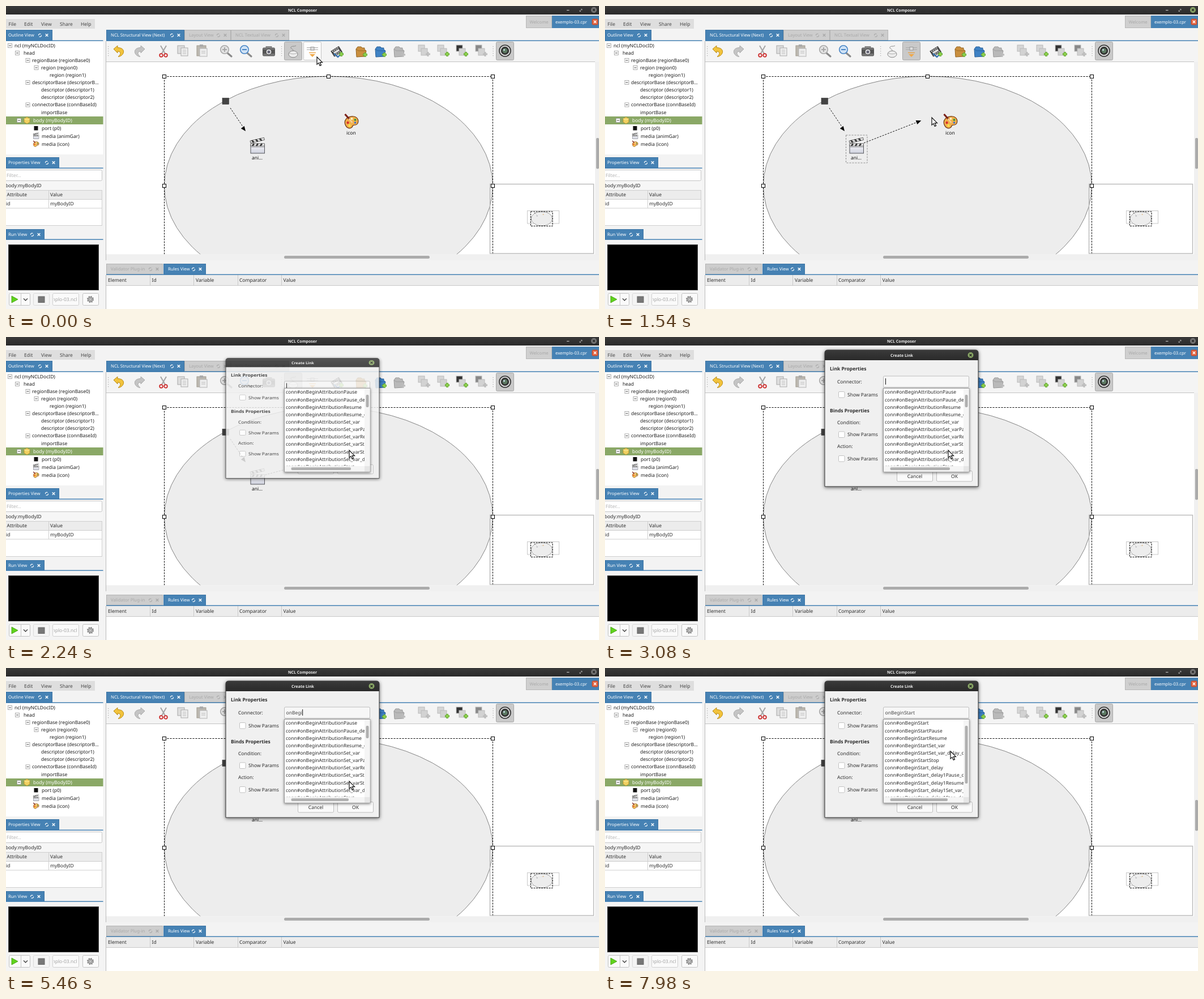
These frames come from a looping animation (1047x535 px, 8000 ms). An HTML page:

```html
<!DOCTYPE html>
<html lang="en">
<head>
<meta charset="utf-8">
<title>NCL Composer</title>
<style>
html, body { margin: 0; width: 100%; height: 100%; overflow: hidden; background: #f3f3f3; }
svg { position: fixed; inset: 0; width: 100%; height: 100%; display: block; }
text { font-family: "Noto Sans", sans-serif; white-space: pre; text-rendering: geometricPrecision; }
</style>
</head>
<body>
<svg id="stage" viewBox="0 0 1047 535"></svg>
<script>
const LOOP = 8000, STEP = 70;
const BLUE = '#4682b4', INK = '#2b2b2b', DIM = '#a9a9a9';
const stage = document.getElementById('stage');

// Markup helpers
const rect = (x, y, w, h, fill, stroke = 'none', more = '') =>
  `<rect x="${x}" y="${y}" width="${w}" height="${h}" fill="${fill}" stroke="${stroke}" ${more}/>`;
const path = (d, stroke = 'none', width = 1, fill = 'none', more = '') =>
  `<path d="${d}" stroke="${stroke}" stroke-width="${width}" fill="${fill}" ${more}/>`;
const disc = (x, y, r, fill, stroke = 'none', more = '') =>
  `<circle cx="${x}" cy="${y}" r="${r}" fill="${fill}" stroke="${stroke}" ${more}/>`;
const text = (x, cy, s, fill = INK, size = 8.5, more = '') =>
  `<text x="${x}" y="${cy + size * .35}" font-size="${size}" fill="${fill}" ${more}>${s}</text>`;
const group = (body, more = '') => `<g ${more}>${body}</g>`;
const at = (x, y, body, scale = 1) => group(body, `transform="translate(${x} ${y}) scale(${scale})"`);
const bold = 'font-weight="700"', mid = 'text-anchor="middle"';
const cross = (x, y, r, color, w = 1.4) =>
  path(`M${x - r} ${y - r}l${2 * r} ${2 * r}m0 ${-2 * r}l${-2 * r} ${2 * r}`, color, w);

function tab(x, y, end, label, active = true) {
  const color = active ? '#fff' : DIM, cy = y + 9.5;
  return rect(x + .5, y + .5, end - x - 1, 18, active ? BLUE : '#cdcdcd', active ? '#3d75a5' : '#b4b4b4') +
    text(x + (x ? 8 : 4), cy, label, color, 7.75) +
    path(`M${end - 24.5} ${cy + .5}a2.5 2.5 0 0 1 4-2.4m1 1.9a2.5 2.5 0 0 1-4 2.4`, color, 1.2) +
    cross(end - 10, cy, 2.3, color);
}

// Icons, each drawn around its own centre
const plus = (x = 7, y = 6) => path(`M${x - 4} ${y}h8m-4-4v8`, '#5d9e2e', 3.6) + path(`M${x - 3.2} ${y}h6.4m-3.2-3.2v6.4`, '#8ed34c', 2.2);
const folder = (color, edge) => path('M-9-4l3-4h6l2 2h4v3l3 2-2 10-15 1z', edge, 1, color) + path('M-9-4l4 3h13', edge, .8);
const folderAdd = (color, edge, live) => folder(color, edge) + (live ? plus() : path('M3 6h8m-4-4v8', '#bbb', 3));
const sheetAdd = (mark, live) => rect(-9, -10, 11, 11, mark, '#b9b9b9') + rect(-4, -4, 11, 12, '#d2d2d2', '#bbb') +
  (live ? plus(8, 6) : path('M4 6h8m-4-4v8', '#bdbdbd', 3));
const curl = (color, edge) => path('M-9-4l7-6v3.5c9 0 12 5 10 10-2 4-6 6-9 6 5-4 6-9-1-9.5v3z', edge, 1, color);
const magnifier = (ring, lens, sign) => path('M3 4l7 6', '#8a8a8a', 3.2, 'none', 'stroke-linecap="round"') +
  disc(-2, -2, 7.3, lens, ring, 'stroke-width="1.6"') + path(sign, ring, 2);
const clapper = () =>
  rect(-12, -.5, 24.5, 14.5, 'url(#slate)', '#55565c') + path('M-11.5 3h23.5', '#777', .8) +
  rect(-12, -3, 24.5, 4, '#f2f2f2', '#444', 'stroke-width=".8"') + path('M-9 1l3-4m4 4l3-4m4 4l3-4', '#333', 2.6) +
  group(rect(-12, -8, 25, 4, '#f2f2f2', '#444', 'stroke-width=".8"') + path('M-6-4l-3-4m10 4l-3-4m10 4l-3-4', '#333', 2.6), 'transform="rotate(-13 -12 -4)"');
const palette = () =>
  path('M-11 5C-13-4-4-9 4-8 12-7 14 0 11 5 8 9 4 6 3 8 2 12-2 14-6 12-9 11-10 8-11 5z', '#6b3410', 1.2, '#f2b04c') +
  disc(-6, 3, 2.2, '#d9302c') + disc(1, -4, 2, '#fff3c0') + disc(7, -2, 2, '#3b9b3b') + disc(7, 3, 1.8, '#3c6fd0') + disc(-3, 8, 2.2, '#f6e04a') +
  path('M-11-12L-3-3', '#7a2018', 3) + path('M-4-4l6 7', '#f0d2a0', 2.2);
const photo = () => rect(-10.5, -6, 21, 14, '#777', '#555', 'rx="1.5"') + rect(-5, -8.5, 10, 3, '#8a8a8a', '#666', 'stroke-width=".7"') +
  rect(-10, -3, 20, 7, '#555') + disc(0, 1, 5, '#e4e4e4', '#444') + disc(0, 1, 2.6, '#667');

function toolbar() {
  const grip = x => Array.from({ length: 5 }, (_, i) => rect(x, 71 + i * 4, 1.2, 1.2, '#aaa')).join('');
  const pages = (a, b) => rect(-9, -9, 12, 14, a, '#aaa') + rect(-3, -5, 12, 14, b, '#aaa') + path('M0-1h6m-6 3h6m-6 3h6', '#bbb');
  return rect(177, 62, 870, 36, '#f4f4f4') + path('M177 98.5H1040', '#c2c2c2') + grip(180) + grip(486) + grip(859.5) +
    at(199, 80, curl('#f2c33c', '#b98a14')) + at(236, 80, group(curl('#c4c4c4', '#aaa'), 'transform="scale(-1 1)"')) +
    at(278, 80, path('M-5-10L3 4M5-10L-3 4', '#a5a5a5', 2) + disc(-4, 7, 2.8, 'none', '#cc2b2b', 'stroke-width="1.8"') + disc(4, 7, 2.8, 'none', '#cc2b2b', 'stroke-width="1.8"')) +
    at(312, 79, pages('#ddd', '#eee')) +
    at(346, 79, rect(-9, -9, 16, 18, '#bcb8b0', '#a09a8e') + rect(-4, -11, 6, 4, '#aaa') + rect(-4, -4, 13, 14, '#eee', '#b4b4b4') + path('M-1 1h7m-7 3h7', '#bbb')) +
    at(388, 79, magnifier('#a8a8a8', '#e2e2e2', 'M-6-2h8m-4-4v8')) +
    at(423, 79, magnifier('#4a86c5', '#cfe2f5', 'M-6-2h8')) + at(464, 80, photo()) +
    rect(491.5, 63.5, 31, 32, '#c9c9c9', '#a8a8a8', 'id="tool1" rx="2"') + rect(525.5, 63.5, 31, 32, '#fdfdfd', '#c4c4c4', 'id="tool2" rx="2"') +
    at(507, 81, `<ellipse cy="4" rx="8" ry="5.8" fill="#ececec" stroke="#888"/>` + path('M0-2c0-4-5-3-4-6s6-1 9-3', '#888', 1) + path('M-7 2q7 3.5 14 0', '#aaa', .9)) +
    at(541, 80, path('M-10-6.5h20M-10-3h20', '#aaa', 1.2) + rect(-3, -7.5, 6, 5.5, '#ddd', '#999') + path('M-5 5h10L0 10z', 'none', 0, '#f0a848') + path('M-6 2.5h12', '#e8a040', 1.3)) +
    at(584, 80, group(rect(-9, -6, 17, 12, '#444') + path('M-7-4h13M-7 4h13', '#eee', 1.6, 'none', 'stroke-dasharray="2 1.5"') + rect(-6, -2, 11, 4, '#d8d8d8'), 'transform="rotate(-32)"') +
      path('M-5 4l7 6 8-8', '#3b75b0', 2.4) + plus(8, 5)) +
    at(627, 80, folderAdd('#c98f3f', '#94641f', 1)) + at(661, 80, folderAdd('#3f82c4', '#285f97', 1)) + at(694, 80, folderAdd('#b9b9b9', '#999')) +
    at(737, 79, sheetAdd('#d6d6d6')) + at(771, 79, sheetAdd('#d6d6d6', 1)) + at(804, 79, sheetAdd('#333', 1)) + at(838, 79, sheetAdd('#888')) +
    rect(865.5, 63.5, 31, 32, '#c9c9c9', '#a8a8a8', 'rx="2"') +
    at(881, 79, disc(0, 0, 10, '#d8d8d8', '#333', 'stroke-width="1.6"') + disc(0, 0, 7.2, '#333') + disc(0, 0, 4.4, '#5c7a62') + disc(-1.5, -1.5, 1.5, '#cde'));
}

function outline() {
  // label, text x, centre y, expander x (0 = leaf)
  const rows = [
    ['ncl (myNCLDocID)', 15, 70, 7], ['head', 31, 83, 20], ['regionBase (regionBase0)', 46, 96, 38.5],
    ['region (region0)', 62, 109, 53.5], ['region (region1)', 77, 122, 0], ['descriptorBase (descriptorB...', 46, 135, 38.5],
    ['descriptor (descriptor1)', 62, 148.5, 0], ['descriptor (descriptor2)', 62, 161.5, 0], ['connectorBase (connBaseId)', 46, 174.5, 38.5],
    ['importBase', 62, 188, 0], ['body (myBodyID)', 48, 202, 23], ['port (p0)', 63, 216, 0],
    ['media (animGar)', 63, 230, 0], ['media (icon)', 63, 244, 0]];
  return rect(0, 62, 171.5, 200, '#fff') + rect(0, 195, 171.5, 14, '#8aa866') +
    rows.map(([s, x, y, box]) => text(x, y, s, y === 202 ? '#fff' : '#1c1c1c') +
      (box ? rect(box - 3.5, y - 3.5, 7, 7, '#fff', '#999', 'stroke-width=".8"') + path(`M${box - 2} ${y}h4`, '#444') : '')).join('') +
    path('M32 199l5-3 5 3v6l-5 3-5-3z', '#b58f2a', .8, '#f0d060') + path('M32 199l5 2 5-2', '#fff0a8') +
    rect(49.5, 212, 7, 7.5, '#111') + at(53, 229, clapper(), .4) + at(53, 243, palette(), .42);
}

function leftDocks() {
  const line = y => rect(0, y, 171.5, 1.6, BLUE);
  return tab(0, 42, 82, 'Outline View') + line(60.5) + outline() +
    tab(0, 267, 94, 'Properties View') + line(285.5) + rect(0, 287, 171.5, 101, '#f6f6f6') +
    rect(-1, 289.5, 170.5, 19, '#fff', '#c4c4c4', 'rx="2"') + text(1, 299, 'Filter...', '#b3b3b3') + text(-1, 317, 'body:myBodyID') +
    rect(-1, 325.5, 170.5, 62, '#fff', '#cfcfcf') + rect(0, 326, 169, 15.5, '#ececec') + text(1.5, 333.5, 'Attribute') + text(78, 333.5, 'Value') +
    text(0, 349.5, 'id') + text(78, 349.5, 'myBodyID') + path('M0 341.5h169M0 357h169M75.5 326v31', '#cfcfcf') +
    tab(0, 394, 68, 'Run View') + line(411.5) + rect(0, 413, 171.5, 122, '#f4f4f4') + rect(4.5, 421.5, 159, 80, '#000', '#444') +
    rect(5.5, 507.5, 37, 21, '#fafafa', '#c2c2c2', 'rx="2"') + path('M26.5 508v20', '#c8c8c8') + path('M10 512l11 6-11 6z', '#3f9b10', .8, '#5fd31c') +
    path('M31 516.5l3.5 3.5 3.5-3.5', '#444', 1.4) + rect(48.5, 507.5, 28, 21, '#f4f4f4', '#dadada', 'rx="2"') + rect(57, 513, 11, 10.5, '#777', '#666') +
    rect(82.5, 507.5, 46, 21, '#fafafa', '#cfcfcf', 'rx="2"') +
    group(text(125.5, 518, 'exemplo-03.ncl', '#a4a4a4', 8.5, 'text-anchor="end"'), 'clip-path="url(#fileClip)"') +
    rect(135.5, 507.5, 28, 21, '#fafafa', '#c2c2c2', 'rx="2"') + disc(149, 518, 5.2, 'none', '#888', 'stroke-width="1.8" stroke-dasharray="2.2 1.88"') +
    disc(149, 518, 4.2, '#b5b5b5', '#777') + disc(149, 518, 1.5, '#f4f4f4', '#888', 'stroke-width=".8"');
}

const nodes = () =>
  rect(382, 162.5, 11.5, 11, '#444', '#333', 'stroke-width=".6"') +
  path('M396 180L419.5 215', '#111', 1, 'none', 'stroke-dasharray="3 2"') + path('M423 221l-8.2-4.8 6-4.2z', 'none', 0, '#000') +
  group(path('', '#111', 1, 'none', 'class="linkLine" stroke-dasharray="3 2"') + path('M0 0l-9-3.7v7.4z', 'none', 0, '#000', 'class="linkHead"'), 'class="link"') +
  at(444, 246, clapper()) + at(609.5, 203, palette()) +
  rect(425.5, 228, 37.5, 49, 'none', '#777', 'class="clapBox" stroke-width=".8" stroke-dasharray="3 2"') +
  rect(590.5, 183.5, 37.5, 49, 'none', '#777', 'class="iconBox" stroke-width=".8" stroke-dasharray="3 2"');

function canvas() {
  const grips = [[279.5, 124.5], [569.5, 124.5], [859.5, 124.5], [279.5, 317.5], [859.5, 317.5]];
  return rect(177, 99, 863, 339.5, '#fff') +
    group(`<ellipse cx="569.5" cy="317.5" rx="290" ry="193.5" fill="#ededed" stroke="#777" stroke-width=".9"/>` + nodes() +
      text(434, 268.5, 'ani...', '#111') + text(601, 224.5, 'icon', '#111') +
      rect(279.5, 124.5, 580, 387, 'none', '#000', 'stroke-dasharray="3 2"') +
      rect(854.5, 314.5, 183, 122.5, 'none', '#b9b9b9', 'stroke-width="1.4"') + rect(920.5, 361.5, 56, 22.5, 'none', '#c8c8c8') +
      `<ellipse cx="946" cy="375.5" rx="18.8" ry="12.6" fill="#ededed" stroke="#888" stroke-width=".8"/>` +
      group(nodes(), 'transform="translate(927 362.8) scale(.0655) translate(-279.5 -124)"') +
      rect(926.5, 363, 38.5, 25.5, 'none', '#000', 'stroke-dasharray="3 1.5"') +
      grips.map(([x, y]) => rect(x - 3, y - 3, 6, 6, '#fff', '#000')).join(''), 'clip-path="url(#viewClip)"') +
    rect(1040, 99, 7, 340, '#f0f0f0') + rect(1042, 233, 5, 54.5, '#ababab', 'none', 'rx="2"') +
    rect(177, 438.5, 870, 10, '#f0f0f0') + rect(491, 441, 257, 5, '#ababab', 'none', 'rx="2.5"') + path('M176.5 62V449', '#bbb');
}

function rulesDock() {
  const heads = [['Element', 180], ['Id', 257.5], ['Variable', 335], ['Comparator', 412], ['Value', 489.5]];
  return tab(177, 455, 277, 'Validator Plug-in', false) + tab(278, 455, 353, 'Rules View') + rect(177, 473.5, 870, 1.6, BLUE) +
    rect(177, 475, 870, 60, '#fff') + rect(177, 475, 870, 18, '#ececec') +
    path('M177 493.5h870M254.5 475v18M331.5 475v18M409.5 475v18M486.5 475v18', '#c9c9c9') + path('M176.5 475v60', '#bbb') +
    heads.map(([s, x]) => text(x, 484.5, s)).join('');
}

function frameTop() {
  const menus = [['File', 4.5], ['Edit', 32], ['View', 62], ['Share', 95], ['Help', 132]];
  return rect(0, 0, 1047, 535, '#f3f3f3') + rect(0, 0, 1047, 15, 'url(#bar)') + text(523.5, 7.5, 'NCL Composer', '#eee', 7, bold + ' ' + mid) +
    path('M990 7.5h4.5', '#bbb', 1.2) + path('M1013 9.5l4-4m-2 0h2v2m-4 0v2h2', '#aaa', .9) +
    disc(1038, 7, 5, '#777', 'none', 'id="close"') + cross(1038, 7, 2, '#222', 1.2) +
    rect(0, 23, 157, 17, '#dedede') + menus.map(([s, x]) => text(x, 32, s, '#444')).join('') +
    rect(918.5, 17.5, 45, 21, '#cfcfcf', '#b8b8b8') + text(924.5, 28, 'Welcome', DIM, 7.7) +
    rect(964, 17, 83, 22, BLUE) + text(970, 28, 'exemplo-03.cpr', '#fff', 7.7) + rect(1035, 23, 10, 10, '#e2603c', '#c94b28', 'rx="1.5"') + cross(1040, 28, 2.2, '#fff') +
    tab(177, 42, 315, 'NCL Structural View (Next)') + tab(315, 42, 397, 'Layout View', false) + tab(397, 42, 500, 'NCL Textual View', false) +
    rect(177, 60.5, 870, 1.6, BLUE);
}

function dialog() {
  const check = y => rect(412.5, y - 5.5, 10.5, 10.5, '#fff', '#c2c2c2', 'rx="1.5"') + text(428, y, 'Show Params');
  const field = y => rect(491.5, y - 10, 151, 20, '#f7f7f7', '#bdbdbd', 'rx="2"');
  const button = (x, s) => rect(x + .5, 236.5, 63, 18.5, '#fafafa', '#bdbdbd', 'rx="2"') + text(x + 32, 246, s, INK, 8.5, mid);
  return path('M388 264V28q0-5 5-5H654q5 0 5 5V264z', '#333', 1, '#f0f0f0', 'filter="url(#shadow)"') +
    path('M388 41V28q0-5 5-5H654q5 0 5 5V41z', 'none', 0, 'url(#bar)') + text(524, 32.5, 'Create Link', '#eee', 7, bold + ' ' + mid) +
    disc(645.5, 32, 5, '#8aa866') + cross(645.5, 32, 2, '#222', 1.2) +
    text(397, 56.5, 'Link Properties', INK, 8.5, bold) + text(410, 79, 'Connector:') + field(79) + check(102) +
    text(397, 130, 'Binds Properties', INK, 8.5, bold) + text(410, 151, 'Condition:') + field(151) + check(172.5) +
    text(410, 193.5, 'Action:') + field(193.5) + check(215) + button(515, 'Cancel') + button(585, 'OK') +
    text(494.5, 79, '', '#444', 8.5, 'id="typed"') + rect(495, 73, 1, 11, '#111', 'none', 'id="caret"');
}

const popup = () => rect(491.5, 90.5, 151.5, 147.5, '#fff', '#999', 'filter="url(#softShadow)"') +
  group(group('', 'id="rows" clip-path="url(#listClip)"') + rect(633, 91, 9.5, 137, '#f5f5f5') + rect(635.5, 102, 5, 23, '#b0b0b0', 'none', 'id="vBar" rx="2"') +
    rect(492, 228, 141, 9.5, '#f5f5f5') + rect(633, 228, 9.5, 9.5, '#e6e6e6') + rect(503.5, 230.3, 105.5, 4.8, '#b0b0b0', 'none', 'id="hBar" rx="2"'), 'id="list"');

const clip = (id, ...box) => `<clipPath id="${id}">${rect(...box, '#000')}</clipPath>`;
const fade = (id, from, to) => `<linearGradient id="${id}" x2="0" y2="1"><stop stop-color="${from}"/><stop offset="1" stop-color="${to}"/></linearGradient>`;
const shade = (id, blur, alpha) => `<filter id="${id}" x="-10%" y="-10%" width="120%" height="120%"><feDropShadow dx="0" dy="1.5" stdDeviation="${blur}" flood-opacity="${alpha}"/></filter>`;
stage.innerHTML = `<defs>${fade('bar', '#3a3a3a', '#2a2a2a')}${fade('slate', '#f6f6fa', '#cfd2de')}${shade('shadow', 3, .6)}${shade('softShadow', 2, .5)}
  ${clip('viewClip', 177, 99, 863, 339.5)}${clip('listClip', 492, 91, 141, 136.5)}${clip('fileClip', 84, 508, 44, 20)}</defs>` +
  frameTop() + toolbar() + leftDocks() + canvas() + rulesDock() + group(dialog(), 'id="dialog"') + group(popup(), 'id="popup"') +
  path('M0 0V13.2l3-2.8 2.2 5 2.3-1-2.2-4.8h4.2z', '#111', 1.2, '#fff', 'id="pointer"');

// Timelines
const pointerKeys = [[0, 549, 90], [70, 548, 89], [280, 543, 87], [350, 543, 87], [1120, 449, 246], [1330, 449, 246],
  [1400, 460, 241], [1540, 577, 197], [1680, 600, 198], [1820, 606, 200], [7420, 606, 200], [7490, 610, 200], [7840, 610, 200], [7910, 620, 185], [7980, 610, 147]];
const typing = [[0, ''], [3220, 'o'], [3430, 'on'], [3780, 'onB'], [3850, 'onBe'], [4060, 'onBen'], [4550, 'onBe'], [4760, 'onBen'], [5250, 'onBe'],
  [5390, 'onBeg'], [5460, 'onBegi'], [5600, 'onBegin'], [6370, 'onBeginS'], [6650, 'onBeginSt'], [6720, 'onBeginSta'], [6930, 'onBeginStar'], [7070, 'onBeginStart']];
const caretOff = [[2590, 3080], [6230, 6370], [7700, LOOP]];
const opening = [[2100, .1, .08], [2170, .55, .5], [2240, .88, .85], [2310, 1, 1]];
const setTails = 'Set_var Set_varPause_delay Set_varResume Set_varStart Set_varStop Set_var_delay Set_var_delayPause';
const lists = [
  [0, 'Attribution', 'Pause Pause_delay Resume Resume_delay Set_var Set_varPause_delay Set_varResume Set_varStart Set_varStop Set_var_delay Start', 22],
  [6370, '', setTails + ' Start StartPause StartResume StartSet_var', 36],
  [6650, 'Start', ' Pause Resume Set_var Set_var_delay_dur Stop _delay _delay1Pause_dur _delay1Resume_dur _delay1Set_var_dur _delay1Stop_delay', 51]];

const $ = id => document.getElementById(id);
const all = (name, fn) => stage.querySelectorAll('.' + name).forEach(fn);
const show = (el, on) => el.style.display = on ? '' : 'none';
const latest = (keys, t) => keys.filter(k => k[0] <= t).pop();

function pointerAt(t) {
  const i = pointerKeys.findIndex(k => k[0] > t);
  if (i < 0) return pointerKeys.at(-1).slice(1);
  const [a, b] = [pointerKeys[i - 1], pointerKeys[i]];
  const u = (t - a[0]) / (b[0] - a[0]), e = u * u * (3 - 2 * u);
  return [a[1] + (b[1] - a[1]) * e, a[2] + (b[2] - a[2]) * e];
}

function drawLink(t, [px, py]) {
  const on = t >= 1400, docked = t >= 1680;
  const [tx, ty] = docked ? [609, 203] : [px, py - 2];
  const dx = tx - 444, dy = ty - 247, len = Math.hypot(dx, dy), ux = dx / len, uy = dy / len;
  const reach = Math.max(len - 20, 15), x = 444 + ux * reach, y = 247 + uy * reach;
  all('link', g => show(g, on));
  all('linkLine', p => p.setAttribute('d', `M${444 + ux * 14} ${247 + uy * 14}L${x - ux * 7} ${y - uy * 7}`));
  all('linkHead', p => p.setAttribute('transform', `translate(${x} ${y}) rotate(${Math.atan2(uy, ux) * 180 / Math.PI})`));
}

let shownList;
function drawPopup(t, typed) {
  show($('popup'), t >= 2100);
  show($('list'), typed !== 'onBen');
  const list = latest(lists, t);
  if (list !== shownList) {
    shownList = list;
    $('rows').innerHTML = list[2].split(' ').map((s, i) => text(494, 97.5 + i * 13.13, 'conn#onBegin' + list[1] + s)).join('');
  }
  $('vBar').setAttribute('height', t >= 6720 ? 102 : list[3]);
  $('hBar').setAttribute('width', t >= 3850 ? 101.5 : 105.5);
}

function drawDialog(t, typed) {
  const open = latest(opening, t);
  show($('dialog'), open);
  if (!open) return;
  $('dialog').setAttribute('transform', `translate(0 144) scale(1 ${open[1]}) translate(0 -144)`);
  $('dialog').setAttribute('opacity', open[2]);
  if ($('typed').textContent !== typed) $('typed').textContent = typed;
  $('caret').setAttribute('x', 495 + (typed ? $('typed').getComputedTextLength() : 0));
  show($('caret'), !caretOff.some(([a, b]) => t >= a && t < b));
}

function setTool(id, state) {
  const [fill, stroke] = { down: ['#c9c9c9', '#a8a8a8'], hover: ['#fdfdfd', '#c4c4c4'], idle: ['none', 'none'] }[state];
  $(id).setAttribute('fill', fill);
  $(id).setAttribute('stroke', stroke);
}

function draw() {
  const t = Math.floor((performance.now() % LOOP) / STEP) * STEP;
  const typed = latest(typing, t)[1], pos = pointerAt(t);
  const linking = t >= 210 && t < 2100;
  setTool('tool1', linking ? 'idle' : 'down');
  setTool('tool2', linking ? 'down' : t < 210 ? 'hover' : 'idle');
  $('close').setAttribute('fill', t >= 70 && t < 2100 ? '#8aa866' : '#777');
  $('pointer').setAttribute('transform', `translate(${pos})`);
  all('clapBox', b => show(b, t < 2100 && t > 420 && pos[1] > 228 || t >= 1400 && t < 2100));
  all('iconBox', b => show(b, t >= 1680 && t < 2100));
  drawLink(t, pos);
  drawDialog(t, typed);
  drawPopup(t, typed);
  requestAnimationFrame(draw);
}
draw();
</script>
</body>
</html>
```
